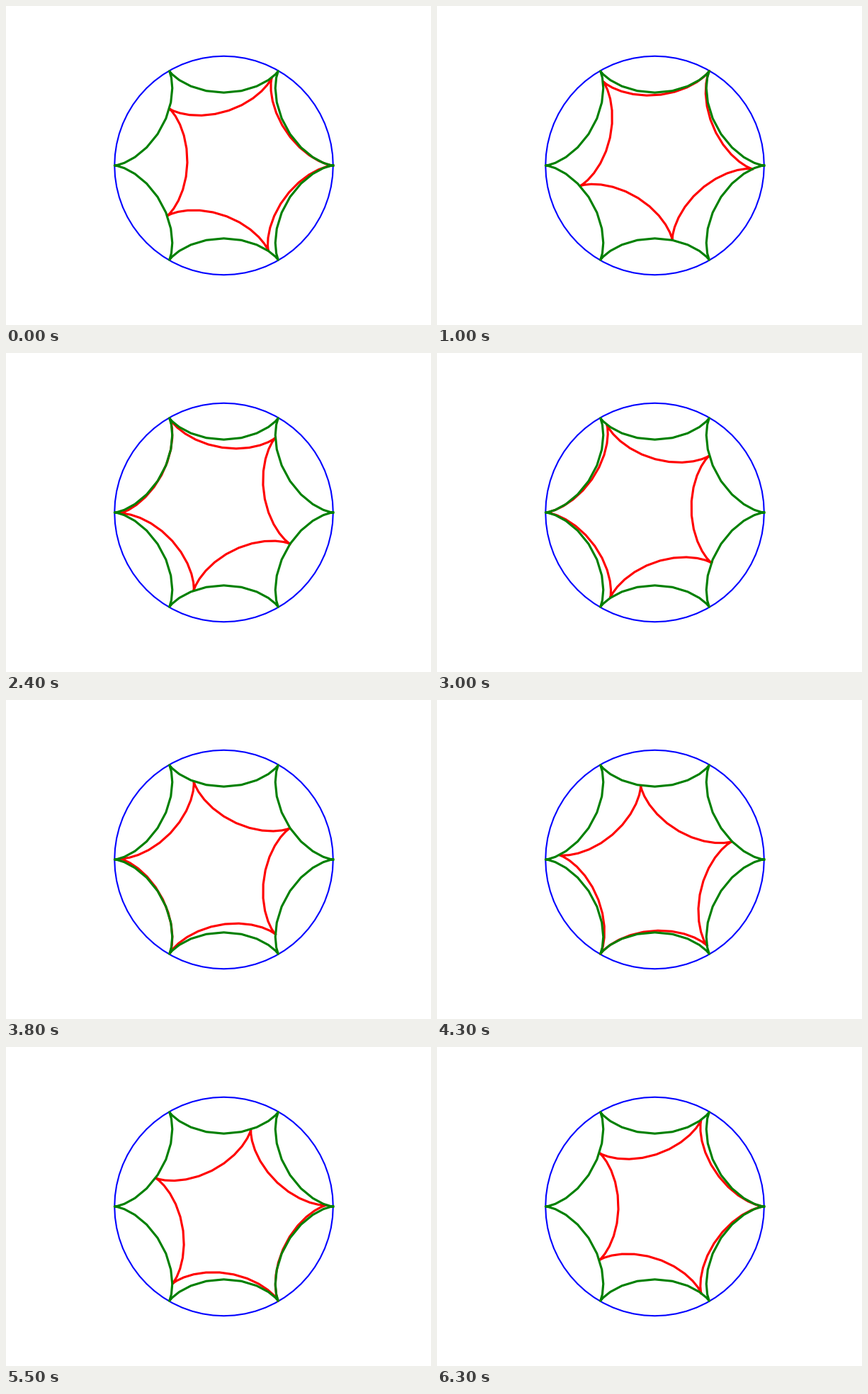
Animation, 600 px wide and 450 px high, one loop 6.4 s. Source, as a matplotlib script:

```python
import numpy as np
import matplotlib.pyplot as plt
from matplotlib.animation import FuncAnimation

STEPS = 64
CUSPS = 6
t = np.linspace(0, 2 * np.pi, STEPS + 1)


def hypocycloid(k):
    """Complex points of a k-cusped hypocycloid traced by a unit circle."""
    return (k - 1) * np.exp(1j * t) + np.exp(-1j * (k - 1) * t)


fig = plt.figure(figsize=(8, 6), dpi=75, facecolor="white")
ax = fig.add_axes([0.125, 0.1, 0.775, 0.8])
ax.set_aspect("equal")
ax.set_xlim(-7, 7)
ax.set_ylim(-7, 7)
ax.axis("off")


def draw(z, color, width):
    return ax.plot(z.real, z.imag, color=color, lw=width)[0]


inner = hypocycloid(CUSPS - 1)
outer = hypocycloid(CUSPS)

draw(CUSPS * np.exp(1j * t), "blue", 2)
roller = draw(inner + 1, "red", 3)
draw(outer, "green", 3)


def update(i):
    # The centre orbits once while the curve turns back by one cusp.
    phi = 2 * np.pi * (i + 1) / STEPS
    z = np.exp(1j * phi) + inner * np.exp(-1j * phi / (CUSPS - 1))
    roller.set_data(z.real, z.imag)
    return [roller]


anim = FuncAnimation(fig, update, frames=STEPS, interval=100,
                     repeat=True, repeat_delay=0)
plt.show()
```
